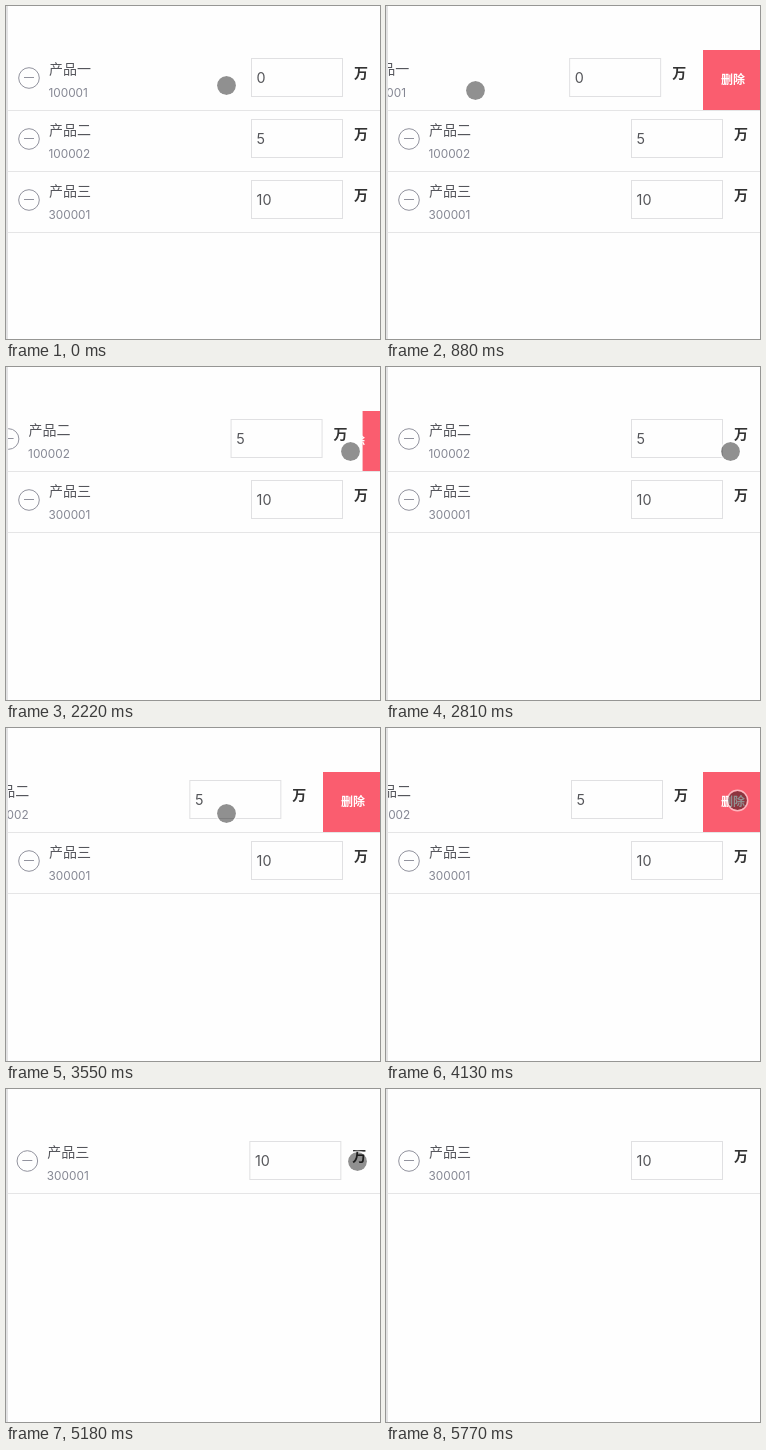
An HTML page with a canvas that plays this animation: 374 px wide and 333 px high, repeating every 6720 ms.

```html
<!DOCTYPE html>
<html lang="zh-CN">
<head>
<meta charset="utf-8">
<title>Swipe to delete</title>
<style>
html, body { margin: 0; width: 100%; height: 100%; overflow: hidden; background: #fefefe; }
canvas { display: block; }
</style>
</head>
<body>
<canvas id="stage" width="374" height="333"></canvas>
<script>
const ctx = document.getElementById('stage').getContext('2d');
const W = 374, H = 333, LOOP = 6720, TICK = 147.9;
const TOP = 44, PITCH = 61, OPEN = 60, PAPER = '#fefefe';
const CJK = '"Noto Sans CJK SC", "Noto Sans CJK", sans-serif';
const LATIN = 'Inter, sans-serif';

const products = [
  { name: '产品一', code: '100001', amount: '0' },
  { name: '产品二', code: '100002', amount: '5' },
  { name: '产品三', code: '300001', amount: '10' }
];

// All times are in ticks.
const home = { x: 220.5, y: 79.5 };
const moves = [
  { at: 2, span: 4, x: 89.5, y: 84.5 },
  { at: 6, span: 4, x: 350, y: 80 },
  { at: 10, span: 2, x: 344.5, y: 84.5 },
  { at: 21, span: 3, x: 220.5, y: 85.5 },
  { at: 24, span: 4, x: 351.5, y: 72.5 },
  { at: 35, span: 4, x: 392, y: 74 }
];
const swipes = [
  { grab: 2, drop: 6, tap: 14 },
  { grab: 21, drop: 24, tap: 32 }
];

const clamp = p => Math.max(0, Math.min(1, p));
const smooth = p => p * p * (3 - 2 * p);

function pointerAt(n) {
  let { x, y } = home;
  for (const m of moves) {
    const p = smooth(clamp((n - m.at) / m.span));
    x += (m.x - x) * p;
    y += (m.y - y) * p;
  }
  return { x, y };
}

// The row follows the drag, resists past OPEN, and eases shut after the tap.
function offsetAt(n) {
  const s = swipes.filter(s => n >= s.grab).pop();
  if (!s) return 0;
  if (n >= s.tap) return -OPEN * (1 - clamp((n - s.tap + 1) / 4.8)) ** 2;
  if (n > s.drop) return -OPEN;
  const pull = pointerAt(s.grab).x - pointerAt(n).x;
  return -Math.min(pull, OPEN) - Math.max(0, pull - OPEN) * 0.026;
}

function box(x, y, w, h, color) {
  ctx.fillStyle = color;
  ctx.fillRect(x, y, w, h);
}

function text(str, x, y, font, color) {
  ctx.font = font;
  ctx.fillStyle = color;
  ctx.fillText(str, x, y);
}

function drawRow(item, y, dx) {
  if (dx) {
    box(317, y, 57, 60, '#fa5d6f');
    text('删除', 335, y + 34, 'bold 12px ' + CJK, '#fff');
  }
  ctx.save();
  ctx.translate(dx, y);
  box(2, 0, 375, 60, PAPER);

  ctx.strokeStyle = '#92939e';
  ctx.lineWidth = 1;
  ctx.beginPath();
  ctx.arc(23, 28, 10.3, 0, Math.PI * 2);
  ctx.moveTo(18, 27.5);
  ctx.lineTo(28, 27.5);
  ctx.stroke();

  text(item.name, 43, 23.6, '14px ' + CJK, '#55565c');
  text(item.code, 42.5, 46.8, '11.8px ' + LATIN, '#858793');

  ctx.strokeStyle = '#e0e0e2';
  ctx.strokeRect(245.5, 8.5, 91, 38);
  text(item.amount, 250.6, 33, '14.3px ' + LATIN, '#55565a');
  text('万', 348, 27.7, 'bold 14px ' + CJK, '#333');
  ctx.restore();
  box(2, y + 60, W, 1, '#e5e5e6');
}

function drawPointer({ x, y }) {
  ctx.beginPath();
  ctx.arc(x, y, 9.5, 0, Math.PI * 2);
  ctx.fillStyle = 'rgba(0,0,0,.43)';
  ctx.fill();
  ctx.beginPath();
  ctx.arc(x, y, 10.2, 0, Math.PI * 2);
  ctx.strokeStyle = 'rgba(255,255,255,.55)';
  ctx.lineWidth = 1.5;
  ctx.stroke();
}

function draw(ms) {
  const n = Math.floor((ms + 12) / TICK);
  const gone = swipes.filter(s => n >= s.tap).length;
  const dx = offsetAt(n);

  box(0, 0, W, H, PAPER);
  products.slice(gone).forEach((p, i) => drawRow(p, TOP + i * PITCH, i ? 0 : dx));
  box(0, 0, 2, H, '#e2e2e3');
  drawPointer(pointerAt(n));
}

const start = performance.now();
function loop() {
  draw((performance.now() - start) % LOOP);
  requestAnimationFrame(loop);
}
draw(0);
requestAnimationFrame(loop);
</script>
</body>
</html>
```
